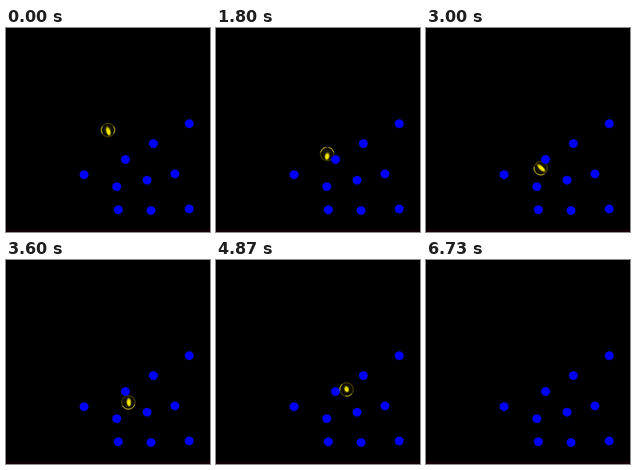
An HTML page with a canvas that plays this animation: 256 by 256 pixels, repeating every 7.47 s.

```html
<!DOCTYPE html>
<html>
<head>
<meta charset="utf-8">
<style>
html, body { margin: 0; width: 100%; height: 100%; overflow: hidden; background: #000; }
canvas { display: block; width: 256px; height: 256px; }
</style>
</head>
<body>
<canvas id="stage" width="256" height="256"></canvas>
<script>
const ctx = document.getElementById('stage').getContext('2d');
const LOOP = 7470, FPS = 15, GONE = 101, R = 9;
const TAU = Math.PI * 2, RAD = Math.PI / 180;

const dots = [[230, 120], [185, 145], [150, 165], [98, 184], [139, 199],
  [177, 191], [212, 183], [141, 228], [182, 229], [230, 227]];

// step, x, y
const path = [[0, 128, 128], [14, 135, 145], [27, 139.5, 158], [36, 138.5, 169],
  [45, 144, 176], [53, 152.5, 179], [62, 162, 172.5], [72, 164, 163.5],
  [84, 159, 150], [90, 155, 147], [97, 151, 147.5], [101, 150, 148]];

// step, shine x, y, length, width, angle, rim angle, rim gap
const looks = [
  [0, 0.3, 1.2, 7.5, 3.6, 74, 90, 90],
  [14, 0.8, 1.8, 6.5, 3.6, 68, 80, 100],
  [27, 0, 2.8, 5.8, 3.8, 100, -90, 45],
  [45, 0.3, -0.6, 8.5, 3.4, 43, 125, 35],
  [62, 0.8, -0.4, 5.6, 3.8, 125, 50, 30],
  [84, -0.8, -0.8, 4.4, 3.6, 20, 215, 100],
  [101, -0.8, -0.8, 4.4, 3.6, 60, 260, 100]
];

// Smooth curve through the rows of a table
function sample(rows, step) {
  let i = 0;
  while (i < rows.length - 2 && rows[i + 1][0] <= step) i++;
  const a = rows[i], b = rows[i + 1];
  const p = rows[Math.max(0, i - 1)], n = rows[Math.min(rows.length - 1, i + 2)];
  const span = b[0] - a[0], u = (step - a[0]) / span;
  return a.slice(1).map((v, k) => {
    const c = k + 1;
    const m0 = (b[c] - p[c]) / (b[0] - p[0]) * span;
    const m1 = (n[c] - v) / (n[0] - a[0]) * span;
    const u2 = u * u, u3 = u2 * u;
    return (2 * u3 - 3 * u2 + 1) * v + (u3 - 2 * u2 + u) * m0 +
      (3 * u2 - 2 * u3) * b[c] + (u3 - u2) * m1;
  });
}

function mix(rows, step) {
  let i = 0;
  while (i < rows.length - 2 && rows[i + 1][0] <= step) i++;
  const a = rows[i], b = rows[i + 1], u = (step - a[0]) / (b[0] - a[0]);
  return a.slice(1).map((v, k) => v + (b[k + 1] - v) * u);
}

function disc(x, y, r, fill) {
  ctx.fillStyle = fill;
  ctx.beginPath();
  ctx.arc(x, y, r, 0, TAU);
  ctx.fill();
}

function rim(angle, half, color) {
  ctx.strokeStyle = color;
  ctx.lineWidth = 1;
  ctx.beginPath();
  ctx.arc(0, 0, R - 0.5, (angle - half) * RAD, (angle + half) * RAD);
  ctx.stroke();
}

function ball(step) {
  const [x, y] = sample(path, step);
  const [sx, sy, len, wid, angle, edge, gap] = mix(looks, step);
  ctx.save();
  ctx.translate(x, y);
  const body = ctx.createRadialGradient(0, 0, 2, 0, 0, R);
  body.addColorStop(0, '#1c1a00');
  body.addColorStop(0.7, '#0c0b00');
  body.addColorStop(1, '#2c2900');
  disc(0, 0, R, body);
  rim(0, 180, '#4a4500');
  rim(edge - gap, 32, '#c8be28');
  rim(edge + gap, 32, '#c8be28');

  ctx.beginPath();
  ctx.arc(0, 0, R - 0.8, 0, TAU);
  ctx.clip();
  ctx.translate(sx, sy);
  ctx.rotate(angle * RAD);
  ctx.scale(len, wid);
  const shine = ctx.createRadialGradient(0.2, 0, 0, 0, 0, 1);
  shine.addColorStop(0, '#fff200');
  shine.addColorStop(0.5, '#e6da00');
  shine.addColorStop(0.75, 'rgba(130,122,0,.8)');
  shine.addColorStop(1, 'rgba(50,46,0,0)');
  disc(0, 0, 1, shine);
  ctx.restore();
}

function draw(ms) {
  const step = Math.floor((ms % LOOP + 4) * FPS / 1000);
  ctx.fillStyle = '#000';
  ctx.fillRect(0, 0, 256, 256);
  ctx.fillStyle = '#100004';
  ctx.fillRect(0, 252, 256, 4);
  if (step < GONE) ball(step);
  for (const [x, y] of dots) disc(x, y, 5.6, '#00f');
}

const start = performance.now();
function tick() {
  draw(performance.now() - start);
  requestAnimationFrame(tick);
}
tick();
</script>
</body>
</html>
```
